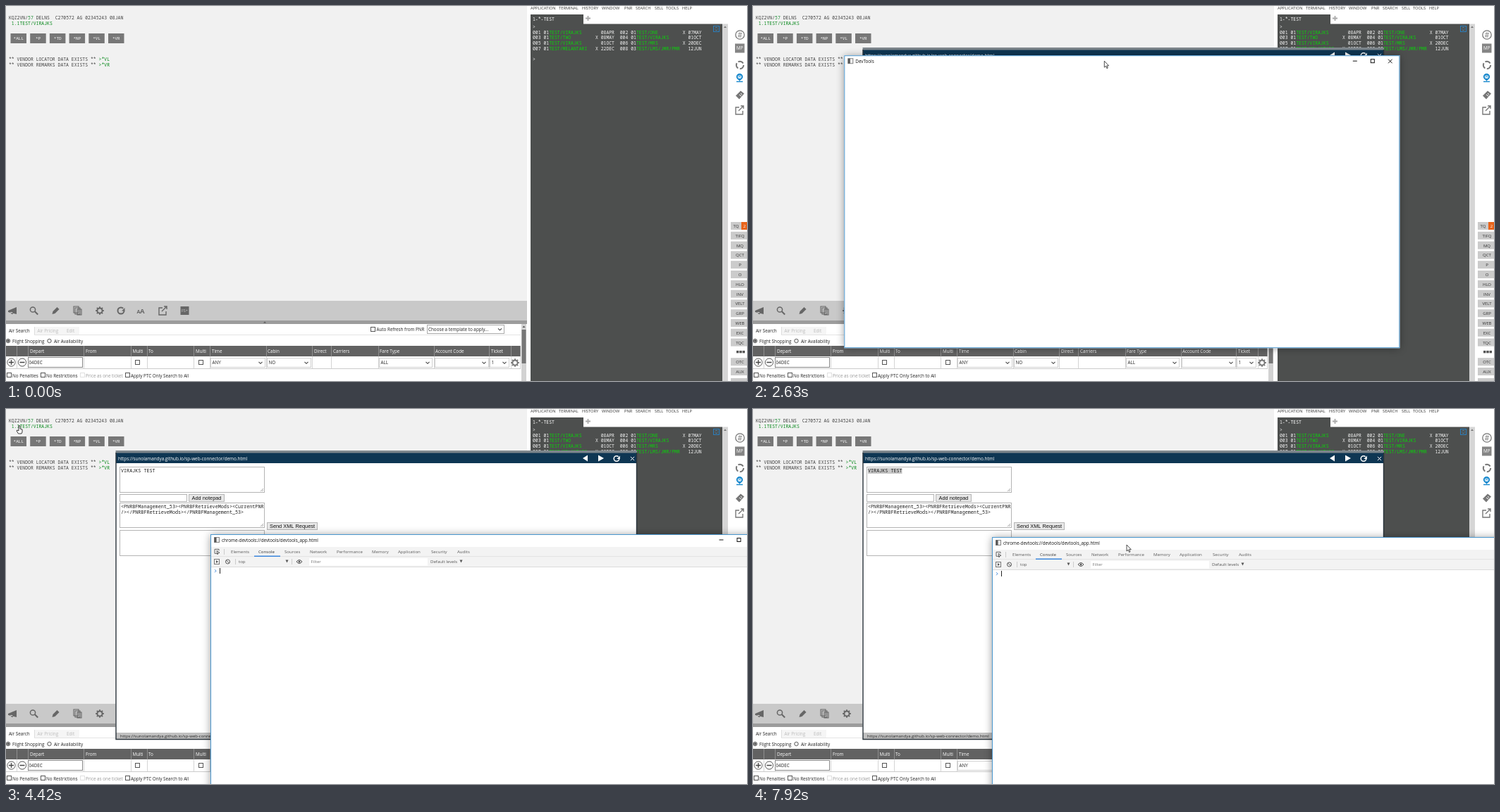
An HTML page with a canvas that plays this animation: 1051x533 px, repeating every 8 s.

```html
<!DOCTYPE html>
<html lang="en">
<head>
<meta charset="utf-8">
<title>Terminal and DevTools</title>
<style>
html, body { margin: 0; width: 100%; height: 100%; overflow: hidden; background: #fff; }
canvas { display: block; width: 1051px; height: 533px; }
</style>
</head>
<body>
<canvas id="stage" width="1051" height="533"></canvas>
<script>
const LOOP = 8000;
const ctx = document.getElementById('stage').getContext('2d');
const UI = '"Open Sans", sans-serif';
const MONO = '"Noto Sans Mono", monospace';
const ARIAL = '"Liberation Sans", sans-serif';
const URL_TEXT = 'https://sunolamandya.github.io/sp-web-connector/demo.html';
const GUEST = 'VIRAJKS';
const COL = 3.867;

// ---- drawing helpers (text is placed by its vertical centre) ----
function rect(x, y, w, h, fill) {
  ctx.fillStyle = fill;
  ctx.fillRect(x, y, w, h);
}
function box(x, y, w, h, stroke, fill) {
  if (fill) rect(x, y, w, h, fill);
  ctx.strokeStyle = stroke;
  ctx.lineWidth = 1;
  ctx.strokeRect(x + .5, y + .5, w - 1, h - 1);
}
function text(str, x, y, color = '#222', size = 6.3, family = UI, align = 'left', weight = 400) {
  ctx.font = `${weight} ${size}px ${family}`;
  ctx.textAlign = align;
  ctx.fillStyle = color;
  ctx.fillText(str, x, y + size * .36);
}
const mono = (str, x, y, color, size = 6.44) => text(str, x, y, color, size, MONO);
function shape(d, x, y, fill, stroke, width = 1) {
  const path = new Path2D(d);
  ctx.save();
  ctx.translate(x, y);
  if (fill) { ctx.fillStyle = fill; ctx.fill(path); }
  if (stroke) { ctx.strokeStyle = stroke; ctx.lineWidth = width; ctx.stroke(path); }
  ctx.restore();
}
function ring(x, y, r, stroke, width = 1, from = 0, to = 7) {
  ctx.beginPath();
  ctx.arc(x, y, r, from, to);
  ctx.strokeStyle = stroke;
  ctx.lineWidth = width;
  ctx.stroke();
}
function gear(x, y, color) {
  ring(x, y, 3.6, color, 2);
  for (let i = 0; i < 8; i++) {
    const c = Math.cos(i * Math.PI / 4), s = Math.sin(i * Math.PI / 4);
    shape(`M${4 * c} ${4 * s}L${5.8 * c} ${5.8 * s}`, x, y, null, color, 1.8);
  }
}
function reload(x, y, r, color, width) {
  ring(x, y, r, color, width, 0, 5.5);
  shape('M1 -3.5V1H-3.5Z', x + r, y - .5, color);
}
const external = (x, y, color) =>
  shape('M0 -4H-5V6H5V1M2 -6H6V-2M6 -6L-1 1', x, y, null, color, 1.4);
const chevron = (x, y) => shape('M-2.5 -1.2L0 1.3L2.5 -1.2', x, y, null, '#444', 1.1);
const checkbox = (x, y, color = '#555') => box(x, y, 7, 7, color, '#fff');
const cross = (x, y, r, color) =>
  shape(`M${-r} ${-r}L${r} ${r}M${r} ${-r}L${-r} ${r}`, x, y, null, color, 1);

// ---- motion helpers ----
const clamp = v => Math.max(0, Math.min(1, v));
function along(t, keys) {
  let i = 0;
  while (i < keys.length - 2 && t > keys[i + 1][0]) i++;
  const a = keys[i], b = keys[i + 1], p = clamp((t - a[0]) / (b[0] - a[0]));
  return [a[1] + (b[1] - a[1]) * p, a[2] + (b[2] - a[2]) * p];
}
const appear = p => 1 - (1 - p) ** 2;

// Runs draw() faded and slightly shrunk around a centre while a window opens.
function opening(p, cx, cy, draw) {
  ctx.save();
  ctx.globalAlpha = p;
  const s = .95 + .05 * p;
  ctx.translate(cx, cy);
  ctx.scale(s, s);
  ctx.translate(-cx, -cy);
  draw();
  ctx.restore();
}
// White window body; the shadow is clipped to the outside so it never shows through a fading body.
function panel(x, y, w, h, active) {
  if (active) {
    const outside = new Path2D();
    outside.rect(x - 20, y - 20, w + 40, h + 40);
    outside.rect(x, y, w, h);
    ctx.save();
    ctx.clip(outside, 'evenodd');
    ctx.shadowColor = 'rgba(0,0,0,.4)';
    ctx.shadowBlur = 11;
    ctx.shadowOffsetY = 1;
    rect(x, y, w, h, '#fff');
    ctx.restore();
  }
  rect(x, y, w, h, '#fff');
}

// ---- application behind the windows ----
function bookingPane(selectedTo) {
  rect(0, 0, 739, 419, '#f1f1f1');
  mono('KQZ2VN/', 4, 17, '#444');
  mono('57', 4 + 7 * COL, 17, '#1c8a35');
  mono('DELNS  C270572 AG 02345243 08JAN', 4 + 10 * COL, 17, '#444');
  if (selectedTo > 15) rect(15, 21, selectedTo - 15, 8, '#5fb0d0');
  mono('1.1TEST/' + GUEST, 4 + COL, 25, '#0a8a1e');
  ['*ALL', '*P', '*TD', '*NP', '*VL', '*VR'].forEach((label, i) => {
    rect(6.5 + i * 27.7, 39, 22.5, 14, '#777');
    text(label, 17.8 + i * 27.7, 46.3, '#fff', 6, MONO, 'center');
  });
  [['LOCATOR', 'L', 76], ['REMARKS', 'R', 83.7]].forEach(([kind, key, y]) => {
    mono(`** VENDOR ${kind} DATA EXISTS **`, 4, y, '#444');
    mono('>*V' + key, 4 + 33 * COL, y, '#0a8a1e');
  });
}

function toolbar() {
  const c = '#666';
  rect(0, 419, 739, 28, '#c9c9c9');
  rect(0, 447, 739, 5, '#9c9c9c');
  shape('M-2 1L0 -1L2 1Z', 367, 449.5, '#555');
  shape('M-6 0L6 -5V5L-6 2ZM-3 2L-1 5L1 5L0 2Z', 9, 433, c);
  ring(38, 431.5, 3.6, c, 1.5);
  shape('M0 0L4.5 4.5', 40.7, 434, null, c, 2);
  shape('M-5 5L-4 1L2 -5L5 -2L-1 4Z', 70.5, 433, c);
  shape('M-6 -6H1V3H-6ZM-4 -4H3V5H-4ZM-1 -2H5V6H-1Z', 102, 433, '#c9c9c9', c, 1.1);
  gear(133, 433, c);
  reload(163, 433, 4.5, c, 2);
  text('A', 185.5, 434, c, 7, UI, 'left', 700);
  text('A', 190, 433.3, c, 9.5, UI, 'left', 700);
  external(222, 433, c);
  rect(247.5, 427, 12, 12, '#666');
  text('FS+', 253.5, 433, '#ccc', 5.5, UI, 'center');
}

function searchForm() {
  rect(0, 452, 739, 81, '#fff');
  rect(40, 456, 64, 11, '#f5f5f5');
  rect(40, 467, 690, 1, '#e4e4e4');
  rect(40, 456, 1, 11, '#ddd');
  text('Air Search', 4, 461.5);
  text('Air Pricing', 44.5, 461.5, '#bbb');
  text('Edit', 86, 461.5, '#bbb');
  checkbox(517, 456);
  text('Auto Refresh from PNR', 525.5, 459.5);
  box(597, 453, 110, 13, '#aaa', '#fff');
  text('Choose a template to apply...', 599, 460);
  chevron(700.5, 459.5);
  ring(3, 476, 2.7, '#555');
  shape('M-1.4 -1.4H1.4V1.4H-1.4Z', 3, 476, '#333');
  text('Flight Shopping', 9, 476.5);
  ring(61.5, 476, 2.7, '#555');
  text('Air Availability', 68, 476.5);

  rect(0, 483, 730, 15, '#626262');
  rect(0, 498, 730, 17, '#fff');
  rect(0, 515, 730, 1, '#ccc');
  [15, 31, 110, 177, 200, 266, 289, 369, 434, 461, 528, 607, 685, 716, 729].forEach(x => {
    rect(x, 483, 1, 15, '#8e8e8e');
    rect(x, 498, 1, 17, '#d4d4d4');
  });
  const heads = { 34: 'Depart', 113: 'From', 179.5: 'Multi', 202: 'To', 269: 'Multi', 292: 'Time', 371: 'Cabin',
    437: 'Direct', 464: 'Carriers', 530: 'Fare Type', 609: 'Account Code', 688: 'Ticket' };
  for (const x in heads) text(heads[x], +x, 491, '#fff');

  ring(7.5, 506.5, 5.6, '#555');
  ring(23, 506.5, 5.6, '#555');
  shape('M-3.5 0H3.5M0 -3.5V3.5M12 0H19', 7.5, 506.5, null, '#444', 1.3);
  box(31, 499, 78, 15, '#888', '#fff');
  text('04DEC', 32.5, 506.8);
  checkbox(183, 503);
  checkbox(273, 503);
  [[290, 78, 'ANY'], [370, 63, 'NO'], [529, 76, 'ALL'], [608, 77, ''], [686, 28, '1']].forEach(([x, w, value]) => {
    box(x, 500, w, 14, '#d0d0d0');
    text(value, x + 2.5, 507);
    chevron(x + w - 7, 507);
  });
  gear(722, 507, '#777');

  [[1, 'No Penalties'], [49, 'No Restrictions'], [105, 'Price as one ticket'], [169, 'Apply PTC Only Search to All']]
    .forEach(([x, label], i) => {
      checkbox(x, 521, i === 2 ? '#e0e0e0' : '#555');
      text(label, x + 8, 525.5, i === 2 ? '#999' : '#222');
    });
  rect(731, 452, 7, 81, '#d2d2d2');
  rect(731.5, 460, 6, 48, '#777');
  shape('M-2 1L0 -1.5L2 1Z', 734.5, 456, '#555');
}

function terminal() {
  rect(739, 0, 312, 533, '#fff');
  const menu = { 744: 'APPLICATION', 784: 'TERMINAL', 817: 'HISTORY', 845: 'WINDOW', 877: 'PNR', 893: 'SEARCH',
    920: 'SELL', 936: 'TOOLS', 959: 'HELP' };
  for (const x in menu) text(menu[x], +x, 3, '#333', 5.75);
  rect(744, 12, 75, 14, '#4d4f4e');
  rect(744, 25.5, 272, 508, '#4d4f4e');
  mono('1-*-TEST', 747, 19, '#fff');
  shape('M-3.5 0H3.5M0 -3.5V3.5', 825.5, 17.5, null, '#aaa', 1.8);
  rect(1016, 25.5, 8, 508, '#d6d6d6');
  shape('M-2 1L0 -1.5L2 1Z', 1020, 30, '#777');
  box(1003, 28, 9, 9, '#2a7fbe');
  shape('M-1.5 -1L0 -2.5L1.5 -1M-1.5 1L0 2.5L1.5 1', 1007.5, 32.5, null, '#4aa3e0', .8);
  mono('>', 747, 29.5, '#eee');
  mono('>', 747, 76, '#eee');
  const guests = ['01' + GUEST, '01ONE', '01TWO', '01' + GUEST, '01' + GUEST, '01MRS', '01MELANTARI', '03LMS/JMR/PMR'];
  const dates = ['08APR', 'X 07MAY', 'X 08MAY', '01OCT', '01OCT', 'X 20DEC', 'X 22DEC', '12JUN'];
  guests.forEach((guest, i) => {
    const x = 747 + (i % 2) * 32 * COL, y = 37.3 + (i >> 1) * 7.75;
    mono(`00${i + 1} ${guest.slice(0, 2)}`, x, y, '#f4f4f4');
    mono('TEST/' + guest.slice(2), x + 6 * COL, y, '#0bd20b');
    mono(dates[i].padStart(7), x + 23 * COL, y, '#f4f4f4');
  });
}

function sidebar() {
  const c = '#777';
  ring(1041, 41, 6.2, c, 1.3);
  text('#', 1041, 41, c, 10, UI, 'center');
  rect(1034, 53.5, 13.5, 13, '#858585');
  text('MP', 1040.7, 60.2, '#fff', 6.3, UI, 'center');
  [0, 2.1, 4.2].forEach(a => ring(1041, 84, 5.2, c, 2, a, a + 1.6));
  ring(1040.5, 100.5, 3.6, '#1386cc', 2);
  shape('M-2.5 3L0 6.5L2.5 3Z', 1040.5, 100.5, '#1386cc');
  text('H', 1040.5, 100.5, '#1386cc', 4.5, UI, 'center', 700);
  shape('M-4.5 7H4.5', 1040.5, 100.5, null, '#1386cc', 1.4);
  shape('M-6 1L1 -6L6 -2L-1 6Z', 1041, 126.5, c);
  shape('M-1 0L2 2M1 -2L3 0', 1041, 126, null, '#fff', 1);
  external(1040, 148, c);
  'TQ TIFQ MQ QCT P O HLO INV VELT GRP WEB EXC TQC … OTC AUX'.split(' ').forEach((label, i) => {
    const y = 312.5 + i * 13.8;
    if (label === '…') {
      [1036, 1040.3, 1044.6].forEach(x => rect(x, y - 2, 3.4, 3.4, '#555'));
      return;
    }
    rect(1028, y - 5.5, 23, 11, '#cbcbcb');
    text(label, i ? 1041 : 1035.5, y + .3, '#333', 6, UI, 'center');
  });
  rect(1043, 307, 8, 11, '#e8641b');
  text('2', 1047.5, 312.8, '#fff', 6, UI, 'center');
  rect(1028, 529, 23, 4, '#cbcbcb');
}

// ---- windows ----
function webButton(label, x, y, w) {
  box(x, y, w, 11, '#b5b5b5', '#e8e8e8');
  text(label, x + w / 2, y + 5.7, '#111', 7.4, ARIAL, 'center');
}
function textarea(x, y, w, h) {
  box(x, y, w, h, '#b4b4b4', '#fff');
  shape('M-5 -1L-1 -5M-3 -1L-1 -3', x + w - 1, y + h - 1, null, '#888', .7);
}
function browser(active, selectedFrom) {
  panel(155.5, 59, 739.5, 411, active);
  rect(155.5, 59, 739.5, 4, '#7d868c');
  rect(156, 62.5, 739, 14.5, '#0e3653');
  text(URL_TEXT, 159, 70.5, '#fff', 6.33);
  shape('M4 -4.5V4.5L-3 0Z', 821, 70, '#fff');
  shape('M-4 -4.5V4.5L4 0Z', 844, 70, '#fff');
  reload(866, 70.5, 3.8, '#fff', 1.5);
  cross(888.5, 70.5, 2.6, '#fff');
  textarea(161, 82, 206, 37);
  if (selectedFrom < 211) rect(selectedFrom, 84, 211.5 - selectedFrom, 8, active ? '#8fc2f5' : '#c8c8c8');
  mono(GUEST + ' TEST', 163, 88, '#222', 6.75);
  box(161, 121, 96, 11, '#b4b4b4');
  webButton('Add notepad', 259, 121, 51);
  textarea(161, 133, 206, 36);
  mono('<PNRBFManagement_53><PNRBFRetrieveMods><CurrentPNR', 163, 138.5, '#222', 6.75);
  mono('/></PNRBFRetrieveMods></PNRBFManagement_53>', 163, 147, '#222', 6.75);
  webButton('Send XML Request', 370, 161, 72);
  textarea(161, 172, 206, 37);
  rect(156, 460, 739, 10, '#c0c0c0');
  text(URL_TEXT, 162, 465, '#222', 5.98);
  shape('M0 0V407.5H738.5V0', 156, 62, null, '#2a333b', 1.4);
}

function devtools(x, y, t, active) {
  const tabs = { 29: 'Elements', 68: 'Console', 105: 'Sources', 141: 'Network', 179: 'Performance', 229: 'Memory',
    266: 'Application', 313: 'Security', 350: 'Audits' };
  const loaded = t > 2950, ready = t > 3450;
  panel(x, y, 788, 416, active);
  ctx.save();
  ctx.translate(x, y);
  box(5, 4, 8, 8, '#888', '#eee');
  rect(5.5, 4.5, 3, 7, '#555');
  const ink = active ? '#111' : '#999';
  text(loaded ? 'chrome-devtools://devtools/devtools_app.html' : 'DevTools', 16, 8.5, ink, 6.3);
  shape('M-3 0H3', 724.5, 8, null, ink);
  ctx.strokeStyle = ink;
  ctx.strokeRect(747, 5.5, 5, 5);
  cross(774.5, 8.3, 2.8, ink);
  if (loaded) {
    rect(1, 18, 786, 13.5, '#f3f3f3');
    rect(1, 31.5, 786, .8, '#cfcfcf');
    rect(19, 21, 1, 8, '#ccc');
    rect(769, 21, 1, 8, '#ccc');
    for (const tx in tabs) text(tabs[tx], +tx, 25, tx === '68' ? '#333' : '#5a5a5a', 6.1);
    rect(62, 30.5, 37, 1.5, '#3b86dc');
  }
  if (ready) {
    shape('M2 3H-3V-3H3V-1M0 -1L4 2L2 2.5L1 4.5Z', 9, 24.3, null, '#555', .9);
    rect(1, 32.3, 786, 14, '#f3f3f3');
    rect(1, 46, 786, .8, '#d4d4d4');
    box(5, 35, 8, 8, '#777');
    shape('M-1 -2L2 0L-1 2Z', 9, 39, '#555');
    ring(24.5, 39, 3, '#555', 1);
    shape('M-2 -2L2 2', 24.5, 39, null, '#555', 1);
    rect(35, 35, 1, 8, '#ccc');
    rect(115, 35, 1, 8, '#ccc');
    text('top', 40, 39.3, '#555', 6.1);
    shape('M-2 -2H2L0 2Z', 108.5, 38.5, '#555');
    shape('M-4 0Q0 -5 4 0Q0 5 -4 0Z', 126, 39, null, '#555', 1);
    rect(124.7, 37.7, 2.6, 2.6, '#555');
    rect(140, 34, 168, 10.5, '#fff');
    text('Filter', 142.5, 39.3, '#777', 6.1);
    text('Default levels', 312, 39.3, '#555', 6.1);
    shape('M-2 -2H2L0 2Z', 355.5, 38.5, '#555');
    shape('M-1 -2L1 0L-1 2', 7, 52.2, null, '#3f87d8', 1);
    if (active && t % 1060 < 530) rect(13, 48, 1, 8, '#222');
  }
  ctx.restore();
  box(x, y, 788, 416, active ? '#4a97cf' : '#c4c4c4');
}

// ---- pointer ----
const pointers = {
  arrow: (x, y) => shape('M0 0V9L2.1 7.2L3.6 10.5L5 9.9L3.5 6.7H6.3Z', x, y, '#fff', '#222', .8),
  hand: (x, y) => shape('M-1 0Q0 -1 1 0V4L4 5V9L3 11H-1.5L-4 7Q-4 5 -1 7Z', x, y, '#fff', '#222', .9),
  beam: (x, y) => shape('M-2 -4.5H2M0 -4.5V4.5M-2 4.5H2', x, y, null, '#222', 1)
};
const pointerPath = [
  [3640, 659, 186], [3790, 640, 178], [4420, 19, 24], [4580, 17, 25], [4650, 15, 25], [5510, 15, 25],
  [5660, 28, 25], [5830, 30, 25], [6200, 70, 26], [6590, 222, 90], [6690, 222, 90], [6790, 212, 89],
  [7150, 153, 92], [7300, 153, 92], [7380, 481, 189], [7600, 481, 189], [7920, 530, 193]
];
function pointer(t, winX, winY) {
  if (t < 140 || (t > 840 && t < 1290)) return;
  let kind = 'arrow', at;
  if (t <= 840) at = along(t, [[140, 948, 506], [360, 1041, 446]]);
  else if (t < 2400) at = along(t, [[1900, 372.5, 69], [2400, 411, 29]]);
  else if (t < 3640) at = [winX + 369, winY + 8];
  else {
    at = along(t, pointerPath);
    if (t > 4300) kind = 'hand';
    if (t > 4620) kind = 'beam';
    if (t > 7330) kind = 'arrow';
  }
  pointers[kind](...at);
  if (t > 1610 && t < 1950) ring(at[0] + 7.5, at[1] + 1, 3, '#2d86d0', 2);
}

function render(t) {
  const pointerX = along(t, pointerPath)[0];
  bookingPane(t >= 5510 && t < 6690 ? Math.min(70, pointerX) : 0);
  toolbar();
  searchForm();
  terminal();
  sidebar();

  if (t >= 840) {
    const active = t < 1610 || (t >= 6690 && t < 7600);
    const from = t < 6790 ? 211 : t > 7150 ? 163 : Math.max(163, pointerX);
    opening(appear(clamp((t - 800) / 260)), 525, 266, () => browser(active, from));
  }
  const [x, y] = t < 3640
    ? along(t, [[2400, 42, 21], [2630, 129, 70], [3000, 240, 142], [3250, 267, 159], [3380, 267, 159], [3640, 290, 178]])
    : along(t, [[7600, 290, 178], [7920, 339, 182]]);
  if (t >= 1610) {
    const active = t < 4680 || t >= 7600;
    opening(appear(clamp((t - 1590) / 275)), x + 394, y + 208, () => devtools(x, y, t, active));
  }
  pointer(t, x, y);
}

function frame() {
  render(performance.now() % LOOP);
  requestAnimationFrame(frame);
}
frame();
</script>
</body>
</html>
```
